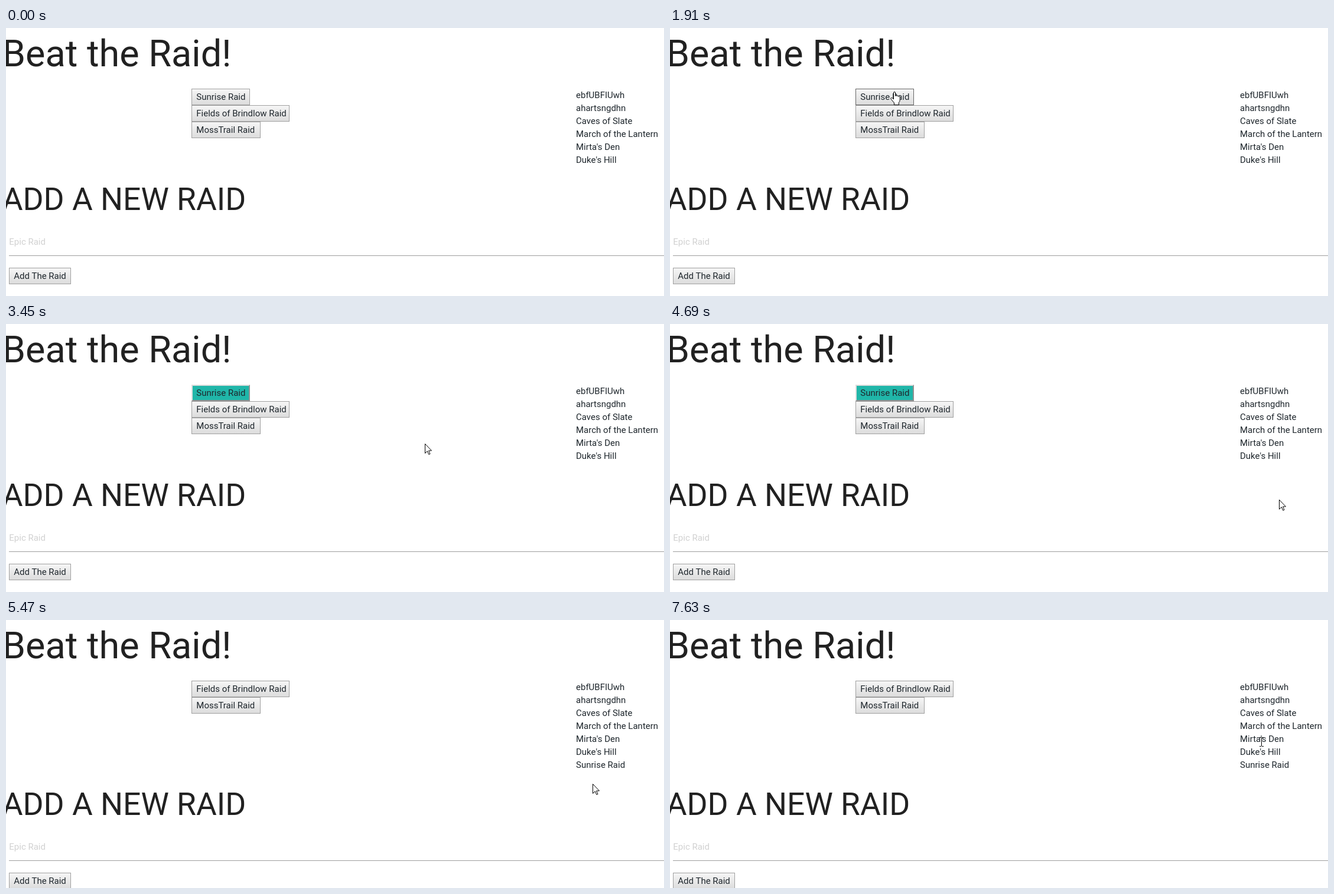
Animation of 1114x455 px, one loop 8 s. Source, as an HTML page:

```html
<!DOCTYPE html>
<html lang="en">
<head>
<meta charset="utf-8">
<title>Beat the Raid!</title>
<style>
html, body { margin: 0; width: 100%; height: 100%; overflow: hidden; background: #fff; }
svg { display: block; }
text { font-family: Roboto, sans-serif; font-size: 15px; fill: #1f272d; white-space: pre; }
.title { fill: #212121; }
.face { fill: url(#face); stroke: #a0a0a0; }
.hover .face { stroke: #666; }
.cursor path { fill: #fff; stroke: #000; }
</style>
</head>
<body>
<svg id="stage" width="1114" height="455" viewBox="0 0 1114 455">
  <defs>
    <linearGradient id="face" x2="0" y2="1">
      <stop stop-color="#f6f6f6"/><stop offset="1" stop-color="#dcdcdc"/>
    </linearGradient>
  </defs>
  <text class="title" x="-6.25" y="65" style="font-size:63px">Beat the Raid!</text>
  <text class="title" id="heading" x="-6.25" style="font-size:53.4px">ADD A NEW RAID</text>
  <text id="hint" x="5.3" style="fill:#d1d1d1">Epic Raid</text>
  <rect id="line" x="5" width="1109"/>
</svg>
<script>
const LOOP = 8000, DONE = 5070;
const stage = document.getElementById('stage');
const [heading, hint, line] = ['heading', 'hint', 'line'].map(id => document.getElementById(id));

function add(parent, tag, attrs, text = '') {
  const el = document.createElementNS('http://www.w3.org/2000/svg', tag);
  for (const name in attrs) el.setAttribute(name, attrs[name]);
  el.textContent = text;
  return parent.appendChild(el);
}
const set = (el, attrs) => { for (const name in attrs) el.setAttribute(name, attrs[name]); };
const move = (el, x, y) => el.setAttribute('transform', `translate(${x} ${y})`);
const show = (el, on) => { el.style.display = on ? '' : 'none'; };

function button(label, width) {
  const g = add(stage, 'g', {});
  add(g, 'rect', { class: 'face', x: .5, y: .5, width: width - 1, height: 27 });
  add(g, 'text', { x: 8.3, y: 19 }, label);
  return g;
}

const first = button('Sunrise Raid', 99);
const second = button('Fields of Brindlow Raid', 166);
const third = button('MossTrail Raid', 117);
const submit = button('Add The Raid', 105);
move(first, 314, 103);

// Focused look of the first button: bevelled teal face
const focus = add(stage, 'g', { transform: 'translate(314 103)' });
const shade = add(focus, 'rect', { width: 99, height: 28 });
const light = add(focus, 'path', { d: 'M0 28V0H99l-2 2H2V26z' });
add(focus, 'rect', { x: 2, y: 2, width: 95, height: 24, fill: '#20b6a9' });
add(focus, 'text', { x: 8.3, y: 19 }, 'Sunrise Raid');

const items = ['ebfUBFIUwh', 'ahartsngdhn', 'Caves of Slate', 'March of the Lantern',
  "Mirta's Den", "Duke's Hill", 'Sunrise Raid']
  .map((label, i) => add(stage, 'text', { x: 965, y: 119 + 22 * i }, label));

const shapes = {
  arrow: 'M.5 .5V16.500L4.300 12.800L6.800 18.500L9 17.600L6.600 12H11.500Z',
  hand: 'M5.500 13V2q0-1.500 1.500-1.500t1.500 1.500V7.500q0-1 1.300-1t1.400 1.200q.2-.8 1.300-.7' +
    't1.300 1.300q.2-.6 1.200-.5t1.300 1.600V14q0 3-2 4.500V22.500H6.500V19L1.300 13q-1-1.500 0-2.300t2.200.2z',
  beam: 'M0 .5H3M4 .5H7M3.500 1V15M0 15.500H3M4 15.500H7'
};
const cursor = add(stage, 'g', { class: 'cursor' });
const pointer = add(cursor, 'path', {});

// start, step length, steps, x, y, shape
const moves = [
  [570, 80, 1, 1016, 423, 'arrow'],
  [650, 80, 2, 943, 345, 'beam'],
  [1040, 75, 3, 563, 127, 'arrow'],
  [1420, 82, 4, 420, 115, 'arrow'],
  [1746, 82, 3, 373, 108, 'hand'],
  [2940, 60, 1, 376, 108, 'hand'],
  [3370, 80, 2, 709, 203, 'arrow'],
  [3830, 75, 3, 1047, 288, 'arrow'],
  [4530, 80, 3, 1031, 298, 'arrow'],
  [5240, 76, 4, 993, 278, 'arrow'],
  [5540, 76, 4, 993, 259, 'arrow'],
  [6000, 80, 2, 991, 237, 'beam'],
  [6390, 80, 2, 991, 240, 'beam'],
  [7090, 75, 3, 999, 203, 'beam'],
  [7550, 80, 2, 998, 199, 'beam']
];

function cursorAt(t) {
  let x = 1016, y = 423, shape = null;
  for (const [start, step, count, toX, toY, kind] of moves) {
    if (t < start) break;
    const part = Math.min(count, Math.floor((t - start) / step) + 1) / count;
    x += (toX - x) * part;
    y += (toY - y) * part;
    shape = kind;
  }
  return { x: Math.round(x), y: Math.round(y), shape };
}

// The input settles from its bare style after the list changes
function settle(t) {
  if (t < DONE) return 1;
  if (t < 5160) return 0;
  const p = Math.min(1, (Math.floor((t - 5160) / 76) + 1) * 76 / 300);
  return 1 - (1 - p) ** 2.5;
}

function draw(t) {
  const done = t >= DONE, shift = done ? 22 : 0;
  const p = settle(t), mix = (a, b) => a + (b - a) * p;
  const { x, y, shape } = cursorAt(t);

  const focused = t >= 2940 && !done, pressed = t < 3060;
  show(first, !done && !focused);
  show(focus, focused);
  first.setAttribute('class', shape === 'hand' ? 'hover' : '');
  set(shade, { fill: pressed ? '#ddd' : '#909090' });
  set(light, { fill: pressed ? '#909090' : '#ddd' });
  move(second, 314, done ? 103 : 131);
  move(third, 314, done ? 131 : 159);
  show(items[6], done);

  set(heading, { y: 309 + shift });
  set(hint, { y: mix(391, 368 + shift) });
  hint.style.fontSize = mix(13.33, 15) + 'px';
  const grey = Math.round(mix(0, 158));
  set(line, {
    y: Math.round(mix(410, 386 + shift)), height: p < .5 ? 2 : 1,
    fill: `rgb(${grey},${grey},${grey})`
  });
  move(submit, 5, Math.round(mix(412, 407 + shift)));

  show(cursor, shape);
  if (shape) {
    set(pointer, { d: shapes[shape] });
    move(cursor, x, y);
  }
}

const begin = performance.now();
function tick() {
  draw((performance.now() - begin) % LOOP);
  requestAnimationFrame(tick);
}
tick();
</script>
</body>
</html>
```
